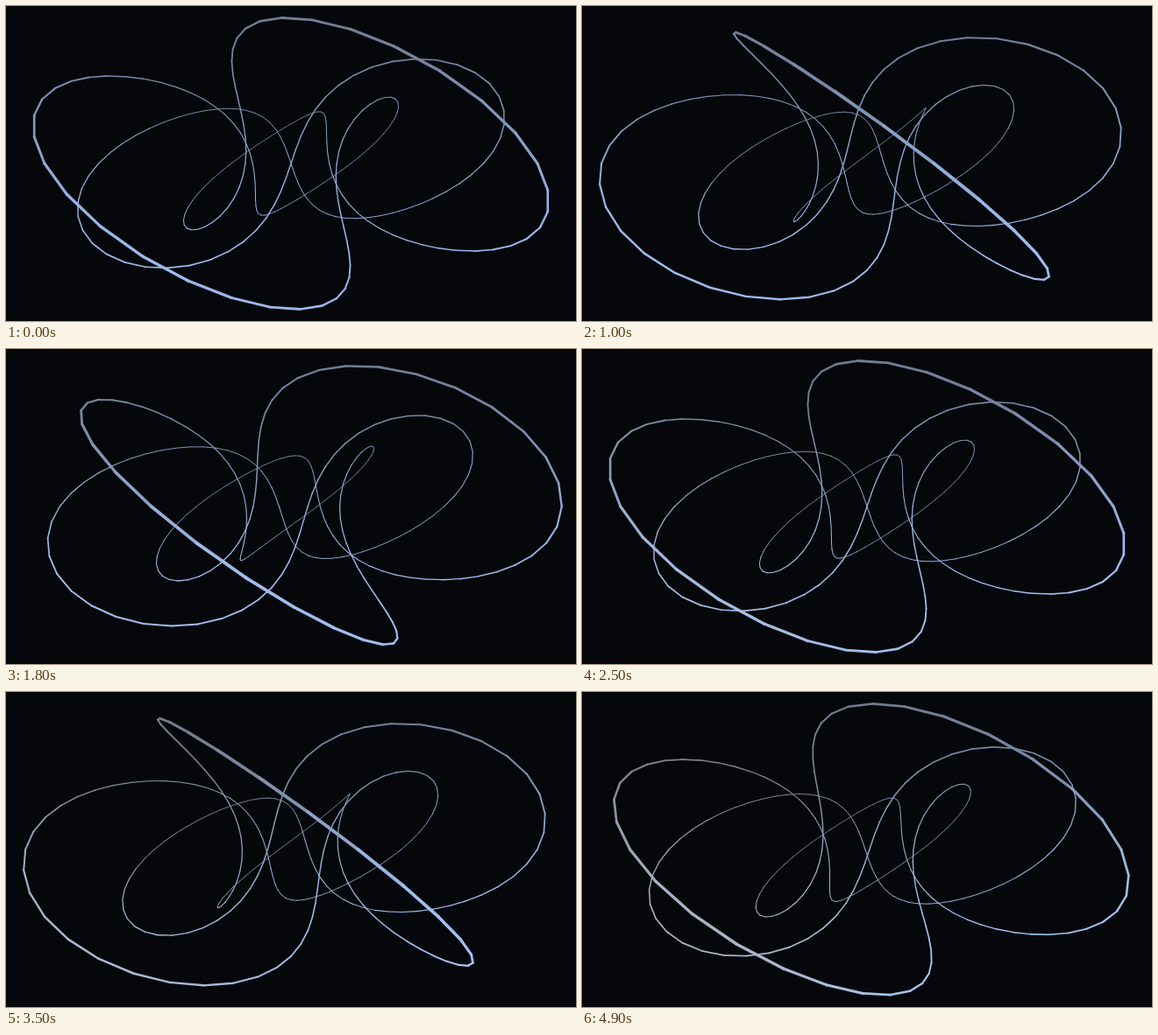
Write an HTML page that moves like this. It is 650 px wide and 360 px high and loops after 5 s.

```html
<!DOCTYPE html>
<html lang="en">
<head>
<meta charset="utf-8">
<title>Rotating torus link</title>
<style>
  html, body { margin: 0; width: 100%; height: 100%; overflow: hidden; background: #05070b; }
  svg { display: block; width: 650px; height: 360px; }
</style>
</head>
<body>
<svg id="stage" viewBox="0 0 650 360" fill="none" stroke-linecap="round"></svg>
<script>
const LOOP = 5000, STEP = 100;
const LOOPS = 3, POINTS = 80;
const RING = 100, TUBE = 60, CAMERA = 227.3;
const FOCAL = 180 / Math.tan(Math.PI / 6);
const TURN = -Math.PI / 7500;   // radians per ms
const STROKE = 270;

const stage = document.getElementById('stage');
const lines = Array.from({ length: LOOPS * POINTS }, () => {
  const line = document.createElementNS('http://www.w3.org/2000/svg', 'line');
  stage.append(line);
  return line;
});

const clamp = v => Math.min(1, Math.max(0, v));
const smooth = v => { v = clamp(v); return v * v * (3 - 2 * v); };
const mix = (a, b, k) => a.map((v, i) => v + (b[i] - v) * k);

// Each loop goes once round the ring and twice round the tube.
function project(loop, i, time) {
  const a = i / POINTS * 2 * Math.PI;
  const tube = 2 * a + Math.PI;
  const angle = a + loop * 2 * Math.PI / LOOPS + time * TURN;
  const radius = RING + TUBE * Math.cos(tube);
  const depth = CAMERA - radius * Math.cos(angle);
  const scale = FOCAL / depth;
  return {
    x: 325 + radius * Math.sin(angle) * scale,
    y: 180 + TUBE * Math.sin(tube) * scale,
    depth
  };
}

// Dim slate above, bright blue below; the left side slowly loses its blue.
function tint(x, y, time) {
  const p = time / LOOP;
  const low = smooth((y - 10) / 270);
  const blue = mix([112, 127, 150], mix([156, 184, 234], [165, 200, 246], p), low);
  const grey = mix([114, 119, 129], [172, 181, 198], low);
  const fade = smooth(p * 1.25 - 0.2) * smooth((470 - x) / 320);
  return `rgb(${mix(blue, grey, fade).map(Math.round)})`;
}

function draw(time) {
  for (let loop = 0; loop < LOOPS; loop++) {
    let from = project(loop, 0, time);
    for (let i = 0; i < POINTS; i++) {
      const to = project(loop, i + 1, time);
      const line = lines[loop * POINTS + i];
      line.setAttribute('x1', from.x.toFixed(2));
      line.setAttribute('y1', from.y.toFixed(2));
      line.setAttribute('x2', to.x.toFixed(2));
      line.setAttribute('y2', to.y.toFixed(2));
      line.setAttribute('stroke-width', (2 * STROKE / (from.depth + to.depth)).toFixed(2));
      line.setAttribute('stroke', tint((from.x + to.x) / 2, (from.y + to.y) / 2, time));
      from = to;
    }
  }
}

const start = performance.now();
function tick() {
  const time = (performance.now() - start) % LOOP;
  draw(Math.floor(time / STEP) * STEP);
  requestAnimationFrame(tick);
}
tick();
</script>
</body>
</html>
```
